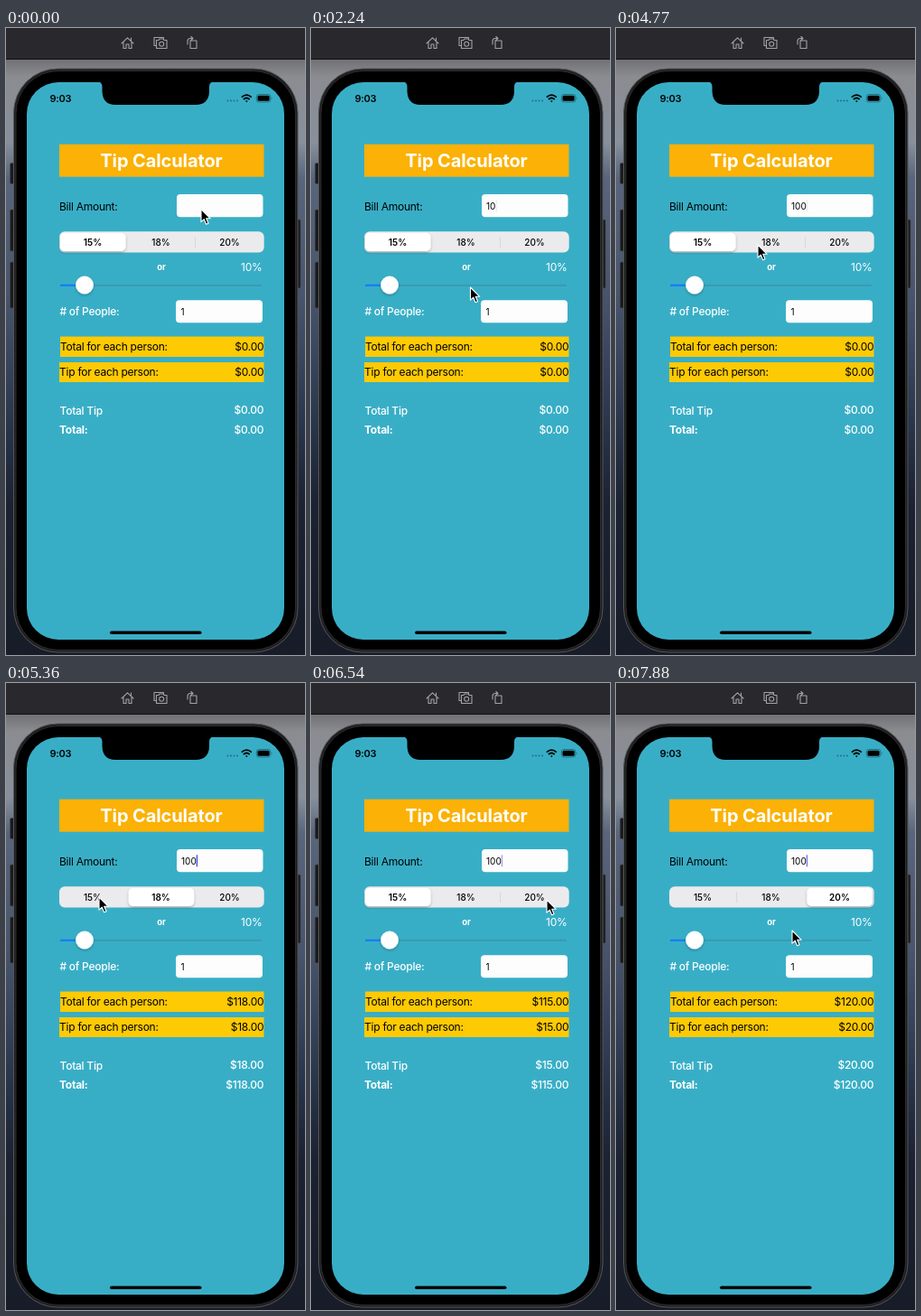
Recreate the animation shown at these times as an HTML page. Size 331 by 694 pixels, loop 8000 ms.

```html
<!DOCTYPE html>
<html lang="en">
<head>
<meta charset="utf-8">
<title>Tip Calculator</title>
<style>
  html, body { margin: 0; width: 100%; height: 100%; overflow: hidden; background: #1a2030; }
  svg { display: block; width: 100vw; height: 100vh; }
  text { font: 400 12px Inter, "Open Sans", sans-serif; letter-spacing: -.25px; }
  .light { fill: #fff; }
  .medium { font-weight: 500; }
  .bold { font-weight: 700; }
  .end { text-anchor: end; }
  .mid { text-anchor: middle; }
  .input { font-size: 10px; letter-spacing: 0; }
  .segment { font-size: 10px; font-weight: 500; letter-spacing: 0; text-anchor: middle; }
  .segment.on { font-weight: 600; }
  .icon { fill: none; stroke: #a2a2a6; stroke-width: 1.1; stroke-linejoin: round; stroke-linecap: round; }
</style>
</head>
<body>
<svg viewBox="0 0 331 694">
  <defs>
    <linearGradient id="sky" x2="0" y2="1">
      <stop offset="0" stop-color="#707073"/>
      <stop offset=".03" stop-color="#8b8c90"/>
      <stop offset=".14" stop-color="#87909c"/>
      <stop offset=".2" stop-color="#58657c"/>
      <stop offset=".4" stop-color="#47546c"/>
      <stop offset=".62" stop-color="#28344a"/>
      <stop offset=".75" stop-color="#1b2232"/>
      <stop offset="1" stop-color="#171c28"/>
    </linearGradient>
    <filter id="soft" x="-50%" y="-50%" width="200%" height="200%">
      <feDropShadow dx="0" dy="1.5" stdDeviation="1.6" flood-opacity=".25"/>
    </filter>
  </defs>

  <rect y="34" width="331" height="660" fill="url(#sky)"/>
  <rect width="331" height="34.5" fill="#28282d"/>
  <rect y="34" width="331" height="1" fill="#111114"/>
  <g class="icon">
    <path d="M128 17 134.500 10.800 141 17M130 15.800V22.500H133V18H136V22.500H139V15.800M138.500 11V13.500"/>
    <path d="M166 19.500H164V10.500H174.500V12.500M166.500 13.500H169L170 12H174L175 13.500H178V22.500H166.500Z"/>
    <circle cx="172.200" cy="17.800" r="2.500"/>
    <path d="M204 14H211V22.500H204ZM201 18V14.500Q201 11.500 204 11.500H206.500M204.800 9.500 207 11.500 204.800 13.500"/>
  </g>

  <g fill="#1b1b1d" stroke="#4b4b4e" stroke-width=".6">
    <rect x="4.500" y="149.500" width="5" height="23" rx="1.500"/>
    <rect x="4.500" y="201" width="5" height="46" rx="1.500"/>
    <rect x="4.500" y="259" width="5" height="51" rx="1.500"/>
    <rect x="321" y="212" width="5" height="76" rx="1.500"/>
  </g>
  <rect x="8.500" y="45" width="314.500" height="646" rx="49" fill="#1d1d1f" stroke="#565659"/>
  <rect x="11" y="47.500" width="309.500" height="641" rx="47" fill="#000" stroke="#39393b" stroke-width=".8"/>
  <rect x="23" y="60" width="285" height="617" rx="35" fill="#38aec6"/>
  <path d="M102 59.500Q106.500 60 106.500 65V70Q107 85 121 85H210Q224.500 85 225 70V65Q225 60 229.500 59.500Z"/>

  <text x="48.500" y="82" style="font-size:11px;font-weight:600">9:03</text>
  <g fill="#1d7385">
    <circle cx="245.500" cy="80.500" r="1"/><circle cx="249" cy="80.500" r="1"/>
    <circle cx="252.500" cy="80.500" r="1"/><circle cx="256" cy="80.500" r="1"/>
  </g>
  <g fill="none" stroke="#000" stroke-width="1.700">
    <path d="M260.800 76.600Q266.300 71.800 271.800 76.600M262.900 79Q266.300 76 269.700 79"/>
    <path d="M266.300 82.200 264.900 80.700Q266.300 79.700 267.700 80.700Z" fill="#000" stroke="none"/>
  </g>
  <rect x="277.300" y="73.500" width="15.500" height="8.500" rx="2.500" fill="none" stroke="#1d6372" stroke-width=".8"/>
  <rect x="278.500" y="74.700" width="13.100" height="6.100" rx="1.500"/>
  <path d="M293.800 76.300Q295.300 77.700 293.800 79.200Z" fill="#1d6372"/>

  <rect x="59" y="128.700" width="226.500" height="36" fill="#fbb105"/>
  <text class="light bold mid" x="172" y="154" style="font-size:20px;letter-spacing:-.1px">Tip Calculator</text>

  <text x="59" y="201.700">Bill Amount:</text>
  <rect x="189" y="184" width="95.500" height="25.200" rx="4" fill="#fdfdfd"/>
  <text class="input" id="bill" x="194" y="200.500"></text>
  <rect id="caret" y="190.300" width="1.400" height="13" fill="#4350d8"/>

  <rect x="59" y="225.200" width="226.700" height="23.200" rx="6" fill="#ebebed"/>
  <rect class="divider" x="133.300" y="231" width=".8" height="12" fill="#d2d2d6"/>
  <rect class="divider" x="209.200" y="231" width=".8" height="12" fill="#d2d2d6"/>
  <rect id="thumb" y="226.700" width="72.500" height="20.300" rx="5" fill="#fff" filter="url(#soft)"/>
  <text class="segment" x="96" y="240.500">15%</text>
  <text class="segment" x="171.500" y="240.500">18%</text>
  <text class="segment" x="247.500" y="240.500">20%</text>

  <text class="light bold mid" x="172" y="267.500" style="font-size:9.500px;letter-spacing:0">or</text>
  <text class="light end" x="283.500" y="269">10%</text>
  <rect x="60" y="283.700" width="223" height="2.400" rx="1.200" fill="#3a9bb2"/>
  <rect x="60" y="283.700" width="27" height="2.400" rx="1.200" fill="#157efb"/>
  <circle cx="87" cy="284.500" r="9.900" fill="#fff" filter="url(#soft)"/>

  <text class="light medium" x="59.500" y="318.300">#&#160;of People:</text>
  <rect x="188" y="301.300" width="96" height="25" rx="4" fill="#fdfdfd"/>
  <text class="input" x="193.500" y="317.500">1</text>

  <rect x="60" y="341.500" width="225.500" height="22.500" fill="#fdca03"/>
  <rect x="59" y="370" width="226.500" height="22" fill="#fdca03"/>
  <text x="60" y="357">Total for each person:</text>
  <text x="59" y="385.300">Tip for each person:</text>
  <text class="light medium" x="59.500" y="427.700">Total Tip</text>
  <text class="light bold" x="59" y="449.300">Total:</text>
  <text class="end total" x="285.300" y="357"></text>
  <text class="end tip" x="285.300" y="385.300"></text>
  <text class="end light medium tip" x="285.300" y="427.300"></text>
  <text class="end light medium total" x="285.300" y="449.300"></text>

  <rect x="115" y="667.500" width="101.500" height="3.600" rx="1.800"/>
  <path id="cursor" d="M0 0V14.200L3.300 11.200 5.600 16.700 8 15.700 5.700 10.300H10.200Z" fill="#000" stroke="#fff" stroke-width="1.100" stroke-linejoin="round"/>
</svg>
<script>
  const LOOP = 8000, STEP = 148.6;
  const $ = id => document.getElementById(id);
  const all = selector => [...document.querySelectorAll(selector)];
  const segments = all('.segment'), dividers = all('.divider');
  const totals = all('.total'), tips = all('.tip');

  // Each track lists [step, ...values].
  const path = [
    [0, 216, 200.5], [2, 214.5, 197.5], [9, 214.5, 197.5], [11, 217, 221],
    [12, 215, 262], [13, 206, 322], [14, 191, 305], [16, 162, 269],
    [18, 163, 253], [20, 165, 241], [23, 157, 240], [34, 157, 240],
    [36, 103, 237], [40, 103, 238], [43, 248, 240], [44, 261, 240],
    [45, 264, 240], [49, 262, 241], [51, 227, 259], [53, 195, 274]
  ];
  const typed = [[0, ''], [9, '1'], [10, '10'], [26, '100']];
  const picks = [[0, 0], [33, 1], [38, 0], [47, 2]];
  const rates = [15, 18, 20];

  const latest = (track, step) => track.findLastIndex(key => key[0] <= step);
  const mix = (a, b, k) => a + (b - a) * k;
  const clamp = v => Math.min(1, Math.max(0, v));

  function along(track, step) {
    const i = latest(track, step), a = track[i], b = track[i + 1] || a;
    const k = b === a ? 0 : (step - a[0]) / (b[0] - a[0]);
    return [mix(a[1], b[1], k), mix(a[2], b[2], k)];
  }

  function caretOpacity(time) {
    if (time < 590) return 0;
    if (time < 1900) return 1;
    const phase = (time - (time < 3800 ? 2900 : 3450) + 3000) % 1000;
    return phase < 150 ? 1 - phase / 170 : phase < 350 ? .12 : clamp((phase - 350) / 100);
  }

  function draw(now) {
    const step = Math.floor(now % LOOP / STEP), time = step * STEP;
    $('cursor').setAttribute('transform', `translate(${along(path, step)})`);

    const bill = typed[latest(typed, step)][1];
    $('bill').textContent = bill;
    $('caret').setAttribute('x', [194, 199, 204.5, 210.7][bill.length]);
    $('caret').setAttribute('opacity', caretOpacity(time));

    const i = latest(picks, step), [start, pick] = picks[i];
    const from = i ? picks[i - 1][1] : pick;
    const slide = clamp((step - start + 1) / 2);
    $('thumb').setAttribute('x', 60 + 75.7 * mix(from, pick, 1 - (1 - slide) ** 2));
    segments.forEach((label, n) => label.classList.toggle('on', n === pick));
    dividers.forEach((line, n) => line.setAttribute('opacity', pick === n || pick === n + 1 ? 0 : 1));

    const tip = i ? rates[pick] : 0;
    tips.forEach(t => t.textContent = `$${tip.toFixed(2)}`);
    totals.forEach(t => t.textContent = `$${(i ? 100 + tip : 0).toFixed(2)}`);
  }

  const origin = performance.now();
  function loop() {
    draw(performance.now() - origin);
    requestAnimationFrame(loop);
  }
  loop();
</script>
</body>
</html>
```
